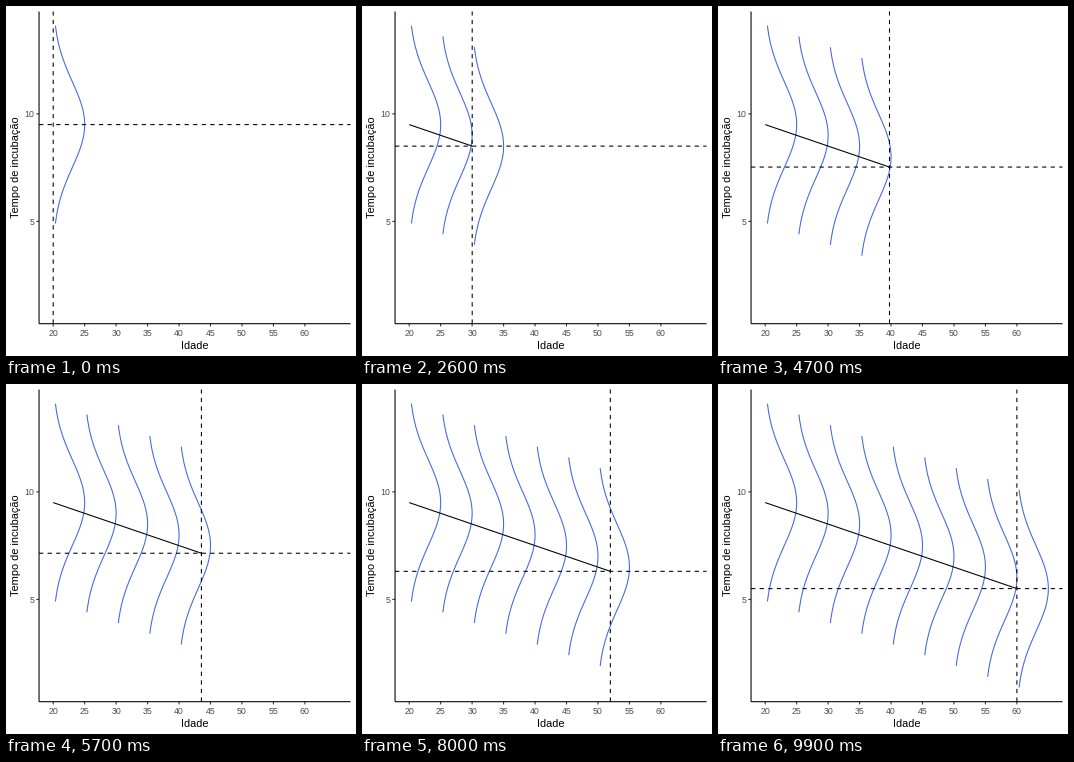
Animation, 350 px wide and 350 px high, one loop 10 s. Source, as a matplotlib script:

```python
import numpy as np
import matplotlib.pyplot as plt
from matplotlib.animation import FuncAnimation

SIZE, DPI = 350, 100
FRAMES, INTERVAL = 100, 100
PX = 72 / DPI                      # points per pixel
LEFT, RIGHT, TOP, BOTTOM = 33.05, 344.5, 5.5, 317.7
AGES = np.arange(20, 61, 5)
KEYS = np.round((FRAMES - 1) * np.arange(9) / 8).astype(int)
X_RANGE = (20 - 2.25, 65 + 2.25)
Y_RANGE = (0.9 - 0.66, 14.1 + 0.66)

plt.rcParams["font.family"] = "Liberation Sans"


def to_x(age):
    return LEFT + (age - X_RANGE[0]) / (X_RANGE[1] - X_RANGE[0]) * (RIGHT - LEFT)


def to_y(days):
    return BOTTOM - (days - Y_RANGE[0]) / (Y_RANGE[1] - Y_RANGE[0]) * (BOTTOM - TOP)


def mean_days(age):
    return 11.5 - 0.1 * age


def cubic_in_out(t):
    return 4 * t ** 3 if t < 0.5 else 1 - 4 * (1 - t) ** 3


def age_at(frame):
    """Eased age between the two key steps around a frame."""
    i = min(np.searchsorted(KEYS, frame, side="right") - 1, len(AGES) - 2)
    t = (frame - KEYS[i]) / (KEYS[i + 1] - KEYS[i])
    return AGES[i] + 5 * cubic_in_out(t)


fig = plt.figure(figsize=(SIZE / DPI, SIZE / DPI), dpi=DPI, facecolor="white")
ax = fig.add_axes([0, 0, 1, 1])
ax.set_xlim(0, SIZE)
ax.set_ylim(SIZE, 0)
ax.axis("off")


def stroke(xs, ys, color="black", **kw):
    line, = ax.plot(xs, ys, color=color, lw=1.07 * PX, snap=False,
                    solid_capstyle="butt", dash_capstyle="butt", **kw)
    return line


def label(x, y, text, size, color="black", ha="center", rotation=0):
    ax.text(x, y, text, fontsize=size * PX, color=color, ha=ha, va="baseline",
            rotation=rotation, rotation_mode="anchor")


# Axes, ticks and titles
for age in AGES:
    x = to_x(age)
    stroke([x, x], [BOTTOM, BOTTOM + 2.75], "#333333")
    label(x, 330, str(age), 8.8, "#4d4d4d")
for days in (5, 10):
    y = to_y(days)
    stroke([LEFT - 2.75, LEFT], [y, y], "#333333")
    label(28.1, y + 3.15, str(days), 8.8, "#4d4d4d", ha="right")
stroke([LEFT, LEFT], [BOTTOM, TOP], zorder=3)
stroke([LEFT, RIGHT], [BOTTOM, BOTTOM], zorder=3)
label((LEFT + RIGHT) / 2, 343, "Idade", 11)
label(13.4, (TOP + BOTTOM) / 2, "Tempo de incubação", 11, rotation=90)

# Normal curves lying on their side, one per age
z = np.linspace(-2.3, 2.3, 100)
bells = [stroke(to_x(a + 5 * np.exp(-z ** 2 / 2)), to_y(mean_days(a) + 2 * z),
                "royalblue") for a in AGES]

trend = stroke([], [], zorder=4)
v_line = stroke([], [], linestyle=(0, (4, 4)), zorder=4)
h_line = stroke([], [], linestyle=(0, (4, 4)), zorder=4)


def update(frame):
    age = age_at(frame)
    x, y = to_x(age), to_y(mean_days(age))
    for bell, key in zip(bells, KEYS):
        bell.set_visible(bool(frame >= key))
    trend.set_data([to_x(20), x], [to_y(mean_days(20)), y])
    v_line.set_data([x, x], [BOTTOM, TOP])
    h_line.set_data([LEFT, RIGHT], [y, y])
    return [*bells, trend, v_line, h_line]


anim = FuncAnimation(fig, update, frames=FRAMES, interval=INTERVAL,
                     init_func=lambda: update(0), repeat=True, repeat_delay=0)
plt.show()
```
